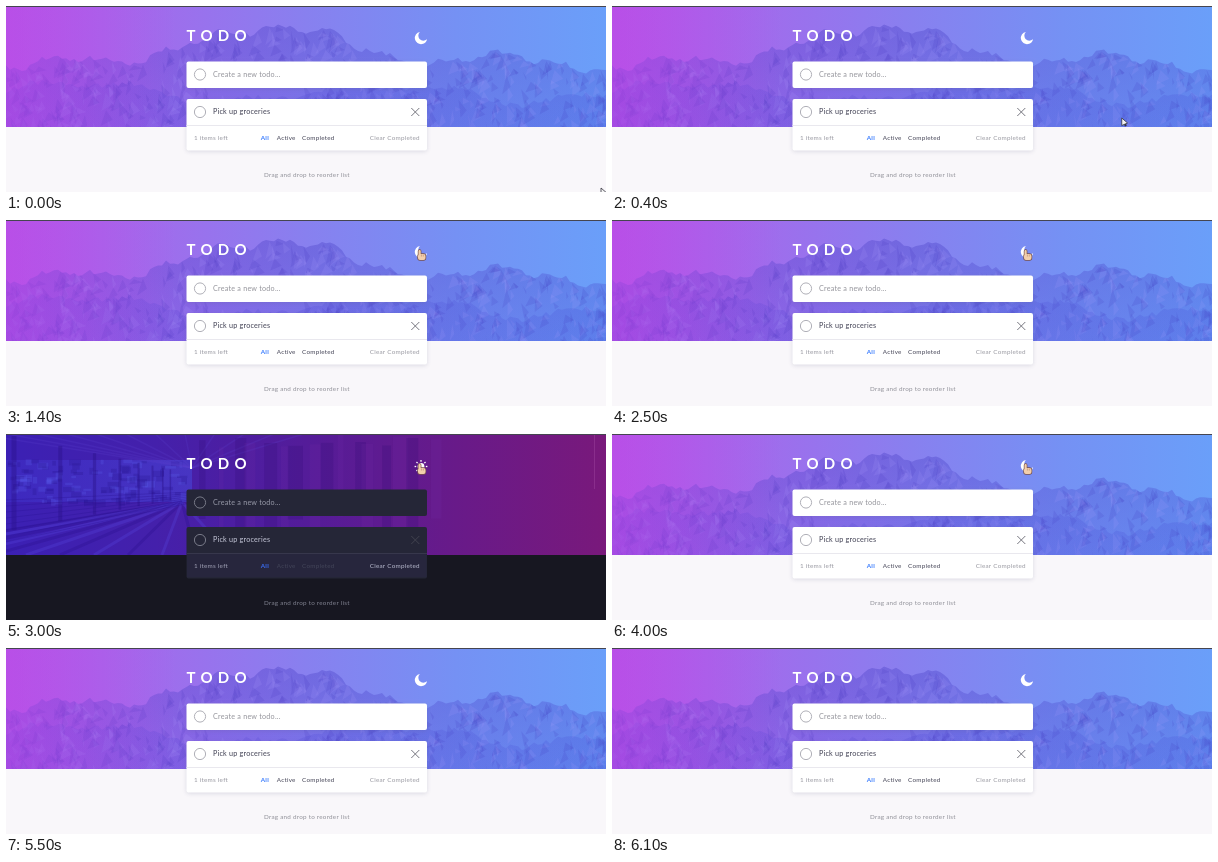
An HTML page with a canvas that plays this animation: 600 px wide and 186 px high, repeating every 6800 ms.

```html
<!DOCTYPE html>
<html lang="en">
<head>
<meta charset="utf-8">
<title>Todo theme switch</title>
<style>
  html, body { margin: 0; width: 100%; height: 100%; overflow: hidden; }
  canvas { display: block; width: 600px; height: 186px; }
</style>
</head>
<body>
<canvas id="stage" width="600" height="186"></canvas>
<script>
const W = 600, H = 186, HERO = 121, LOOP = 6800;
const ctx = document.getElementById('stage').getContext('2d');

const LIGHT = {
  page: '#f9f7fa', card: '#fff', foot: '#fff', line: '#e9e8ee', shadow: 'rgba(90,90,130,.2)',
  ring: '#b0b0b8', hint: '#929299', task: '#3f3f52', cross: '#77777f',
  count: '#96969f', all: '#3a7cfd', filter: '#454557', clear: '#9a9aa2', note: '#909098'
};
const DARK = {
  page: '#171721', card: '#252637', foot: '#27263d', line: '#37374c', shadow: 'transparent',
  ring: '#777987', hint: '#9a9cab', task: '#c9cbdc', cross: '#41424f',
  count: '#a3a4b8', all: '#3a6cf0', filter: '#434559', clear: '#b9bbcf', note: '#808290'
};

function seeded(seed) {
  return () => (seed = (seed * 16807) % 2147483647) / 2147483647;
}

function line(g, x1, y1, x2, y2, color, width = 1) {
  g.beginPath();
  g.moveTo(x1, y1);
  g.lineTo(x2, y2);
  g.strokeStyle = color;
  g.lineWidth = width;
  g.stroke();
}

function ramp(g, x1, y1, x2, y2, colors) {
  const fill = g.createLinearGradient(x1, y1, x2, y2);
  colors.forEach((c, i) => fill.addColorStop(i / (colors.length - 1), c));
  return fill;
}

const bump = (x, center, width) => Math.exp(-(((x - center) / width) ** 2));

// Fills the land below a ridge and covers it with random rock facets.
function range(g, ridge, top, bottom, rnd, facets) {
  g.save();
  g.beginPath();
  g.moveTo(0, HERO);
  for (let x = 0; x <= W; x += 4) g.lineTo(x, ridge(x) + (rnd() - .5) * 6);
  g.lineTo(W, HERO);
  g.fillStyle = ramp(g, 0, 15, 0, HERO, [top, bottom]);
  g.fill();
  g.clip();
  for (let i = 0; i < facets; i++) {
    const x = rnd() * W, y = ridge(x) + rnd() ** 1.4 * 80;
    const w = 2 + rnd() * 7, h = 5 + rnd() * 14;
    g.beginPath();
    g.moveTo(x, y);
    g.lineTo(x + w, y + h * .6);
    g.lineTo(x + (rnd() - .6) * 10, y + h);
    g.fillStyle = rnd() < .55 ? 'rgba(60,45,175,.13)' : 'rgba(180,160,255,.13)';
    g.fill();
  }
  g.restore();
}

function mountains(g) {
  const rnd = seeded(73);
  const far = x => 64 - 40 * bump(x, 300, 75) - 26 * bump(x, 200, 60)
    - 14 * bump(x, 65, 45) - 16 * bump(x, 495, 55) + 3 * Math.sin(x / 9);
  const near = x => 86 - 10 * Math.sin(x / 48) - 4 * Math.sin(x / 17);
  g.fillStyle = ramp(g, 0, 0, W, 0, ['#b75ce9', '#a06cec', '#8880ef', '#7591f4', '#6a9ff9']);
  g.fillRect(0, 0, W, HERO);
  range(g, far, 'rgba(70,60,195,.36)', 'rgba(75,70,210,.2)', rnd, 420);
  range(g, near, 'rgba(60,55,200,.12)', 'rgba(60,55,205,.16)', rnd, 260);
  g.fillStyle = ramp(g, 0, 0, 170, 0, ['rgba(186,66,230,.5)', 'rgba(186,66,230,0)']);
  g.fillRect(0, 0, 170, HERO);
}

function pier(g) {
  const rnd = seeded(29);
  const endX = 186, endY = 52;
  g.save();
  g.beginPath();
  g.rect(0, 0, W, HERO);
  g.clip();
  g.fillStyle = ramp(g, 0, 0, W, 0, ['#3b20b4', '#4420ab', '#541c99', '#681a89', '#79197b']);
  g.fillRect(0, 0, W, HERO);

  // Windows along the corridor
  g.fillStyle = ramp(g, 0, 0, 200, 0, ['rgba(66,60,215,.3)', 'rgba(72,78,225,.5)']);
  g.fillRect(0, 26, endX, 42);
  for (let i = 0; i < 120; i++) {
    g.fillStyle = rnd() < .55 ? 'rgba(38,18,140,.25)' : 'rgba(95,105,245,.2)';
    g.fillRect(rnd() * 180, 24 + rnd() * 44, 3 + rnd() * 9, 2 + rnd() * 5);
  }

  // Roof beams and floor boards meet at the far end
  for (let i = 0; i < 12; i++) {
    const spread = i * 34;
    line(g, endX, endY - 18, spread - 60, -5, 'rgba(90,65,205,.22)', 1.5);
    line(g, endX - 10, endY + 16, spread - 150, HERO,
      i % 2 ? 'rgba(88,70,222,.3)' : 'rgba(40,16,140,.3)', 3);
  }
  for (let i = 0; i < 8; i++) {
    const depth = .74 ** i, x = endX - 178 * depth;
    line(g, x, endY - 12 - 38 * depth, x, endY + 10 + 34 * depth, 'rgba(40,16,135,.4)', 1 + 4 * depth);
    line(g, 0, 66 + i * 6, endX, 58 + i * 1.5, 'rgba(42,18,145,.3)');
  }

  // Soft pillars fade into the plain right side
  for (let i = 0; i < 16; i++) {
    const x = 190 + i * 15 + rnd() * 10, w = 4 + rnd() * 12;
    g.fillStyle = i % 2 ? 'rgba(115,45,165,.17)' : 'rgba(48,10,115,.22)';
    g.fillRect(x, rnd() * 14, w, 65 + rnd() * 56);
  }
  line(g, 588.5, 0, 588.5, 55, 'rgba(165,75,165,.4)');
  g.restore();
}

function text(g, str, x, y, color, size = 6.3, weight = 400, spacing = .25) {
  g.font = `${weight} ${size}px Lato, sans-serif`;
  g.letterSpacing = spacing + 'px';
  g.fillStyle = color;
  g.fillText(str, x, y);
}

function card(g, y, h, theme) {
  g.save();
  g.shadowColor = theme.shadow;
  g.shadowBlur = 4;
  g.shadowOffsetY = 1;
  g.fillStyle = theme.card;
  g.beginPath();
  g.roundRect(180.5, y, 240.5, h, 2);
  g.fill();
  g.restore();
}

function disc(g, x, y, r) {
  g.beginPath();
  g.arc(x, y, r, 0, 7);
}

function ring(g, y, theme) {
  disc(g, 194, y, 5.6);
  g.strokeStyle = theme.ring;
  g.lineWidth = 1;
  g.stroke();
}

function moon(g) {
  g.fillStyle = '#fff';
  g.beginPath();
  g.arc(415, 32, 6.2, -1.75, .2, true);
  g.quadraticCurveTo(417, 36.3, 413.5, 33);
  g.quadraticCurveTo(411, 29, 413.9, 25.9);
  g.fill();
}

function sun(g) {
  g.fillStyle = '#fff';
  disc(g, 415, 32.5, 3.4);
  g.fill();
  for (let i = 0; i < 8; i++) {
    const c = Math.cos(i * Math.PI / 4), s = Math.sin(i * Math.PI / 4);
    line(g, 415 + c * 4.8, 32.5 + s * 4.8, 415 + c * 6.4, 32.5 + s * 6.4, '#fff', 1.3);
  }
}

function scene(theme, hero, icon) {
  const canvas = document.createElement('canvas');
  canvas.width = W;
  canvas.height = H;
  const g = canvas.getContext('2d');
  g.fillStyle = theme.page;
  g.fillRect(0, 0, W, H);
  hero(g);
  g.fillStyle = '#454550';
  g.fillRect(0, 0, W, 1);

  text(g, 'TODO', 180.5, 35.2, '#fff', 15, 700, 5.3);
  icon(g);

  card(g, 55.5, 26.5, theme);
  ring(g, 68.5, theme);
  text(g, 'Create a new todo...', 207, 71, theme.hint, 7.2, 400, .22);

  card(g, 93, 51.5, theme);
  g.fillStyle = theme.foot;
  g.fillRect(181, 120, 239.5, 23);
  line(g, 180.5, 119.5, 421, 119.5, theme.line);
  ring(g, 106, theme);
  text(g, 'Pick up groceries', 207, 108.3, theme.task, 7.2, 400, .22);
  line(g, 405.3, 102, 413.3, 110, theme.cross);
  line(g, 413.3, 102, 405.3, 110, theme.cross);

  text(g, '1 items left', 188, 133.5, theme.count);
  text(g, 'All', 254.7, 133.5, theme.all, 6.3, 700);
  text(g, 'Active', 270.7, 133.5, theme.filter);
  text(g, 'Completed', 296, 133.5, theme.filter);
  text(g, 'Clear Completed', 363.7, 133.5, theme.clear);
  text(g, 'Drag and drop to reorder list', 258, 171, theme.note);
  return canvas;
}

function arrow(x, y) {
  line(ctx, x + 2, y + 4, x + 4.2, y + 8, '#33333d', 2);
  ctx.beginPath();
  ctx.moveTo(x, y);
  ctx.lineTo(x, y + 7.5);
  ctx.lineTo(x + 5.8, y + 5);
  ctx.closePath();
  ctx.fillStyle = '#f2f2f2';
  ctx.fill();
  ctx.strokeStyle = '#33333d';
  ctx.lineWidth = .8;
  ctx.stroke();
}

function hand(x, y) {
  ctx.beginPath();
  ctx.roundRect(x - 1, y, 2.2, 7, 1);
  ctx.roundRect(x - 1.5, y + 4, 7.5, 6, 2);
  ctx.strokeStyle = '#79524c';
  ctx.lineWidth = 1.4;
  ctx.stroke();
  ctx.fillStyle = '#f3cfac';
  ctx.fill();
  for (let i = 1; i < 3; i++) {
    line(ctx, x + i * 1.9, y + 4.5, x + i * 1.9, y + 6.5, '#a9775f', .5);
  }
}

// Eased progress from 0 to 1 between two times.
function ease(t, start, end) {
  const u = Math.min(1, Math.max(0, (t - start) / (end - start)));
  return u * u * (3 - 2 * u);
}

function cursor(t) {
  const enter = ease(t, 0, 800), settle = ease(t, 800, 1400), leave = ease(t, 5200, 5500);
  const x = 595 - 170.5 * enter - 11 * settle + 38 * leave;
  const y = 182 - 140 * enter - 12 * settle - 44 * leave;
  const overIcon = x < 420 && y > 24;
  (overIcon ? hand : arrow)(x, y);
}

const day = scene(LIGHT, mountains, moon);
const night = scene(DARK, pier, sun);

function draw() {
  const t = Math.floor(performance.now() % LOOP / 100) * 100;
  ctx.drawImage(t >= 3000 && t < 4000 ? night : day, 0, 0);
  cursor(t);
  requestAnimationFrame(draw);
}
draw();
</script>
</body>
</html>
```
